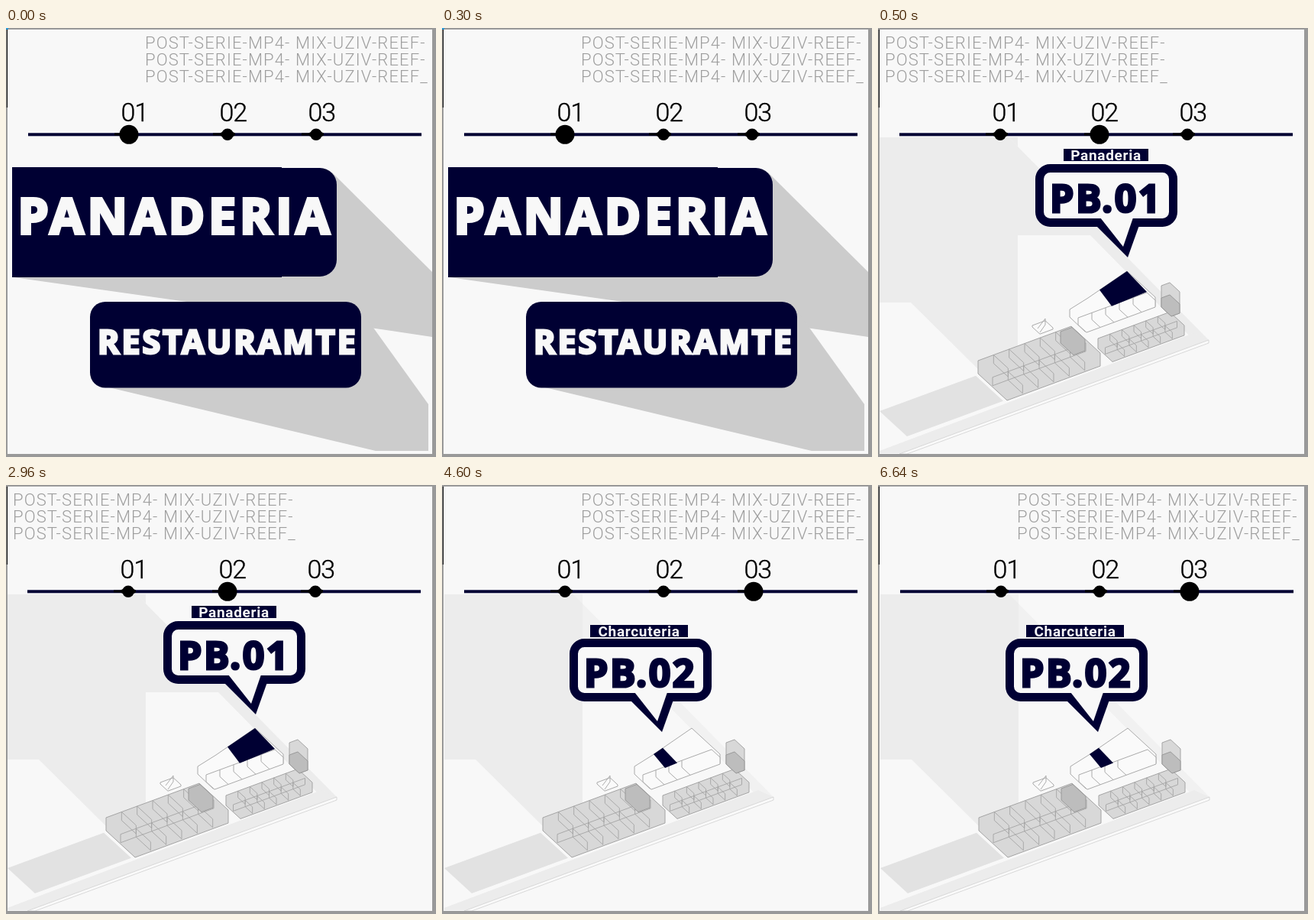
An HTML page for the animation above (8000 ms loop, 563 px wide and 561 px high).

```html
<!DOCTYPE html>
<html lang="es">
<head>
<meta charset="utf-8">
<title>Panaderia</title>
<style>
  html, body { margin: 0; width: 100%; height: 100%; overflow: hidden; background: #f8f8f8; }
  svg { display: block; width: 100%; height: 100%; }
  .header { font: 300 22px Roboto, sans-serif; letter-spacing: 1.12px; fill: #9e9e9e; }
  .number { font: 300 34px Roboto, sans-serif; letter-spacing: -1px; stroke: #000; stroke-width: .4; }
  .heavy { font-family: "Open Sans", sans-serif; font-weight: 700; fill: #f8f8f8; stroke: #f8f8f8; }
  .title { font-size: 64px; letter-spacing: 5px; stroke-width: 4; }
  .subtitle { font-size: 43px; letter-spacing: 3px; stroke-width: 3; }
  .code { font-size: 50px; letter-spacing: 2.5px; stroke-width: 3; fill: #003; stroke: #003; }
  .label { font: 700 19px Roboto, sans-serif; letter-spacing: .7px; fill: #f8f8f8; text-anchor: middle; }
  .navy { fill: #003; }
  .paper { fill: #f8f8f8; }
  .shadow { fill: #ccc; }
  .ground { fill: #ececec; }
  .parcel { fill: #e2e2e2; }
  .block { fill: #d8d8d8; stroke: #a4a4a4; }
  .dark { fill: #bdbdbd; stroke: #999; }
  .walls { fill: none; stroke: #a4a4a4; stroke-width: .9; }
  .room { fill: #fafafa; stroke: #aaa; }
  .curb { fill: #fafafa; stroke: #d5d5d5; stroke-width: .9; }
  .bubble { fill: #f8f8f8; stroke: #003; stroke-width: 11; }
</style>
</head>
<body>
<svg viewBox="0 0 563 561" preserveAspectRatio="none"></svg>
<script>
const LOOP = 8000;
const STARTS = [0, 500, 4600];
const RISE = .368;   // slope of plan lines going right
const FALL = .92;    // slope of plan lines going towards the viewer

const poly = (cls, points) => `<polygon class="${cls}" points="${points}"/>`;
const rect = (cls, x, y, w, h, rx = 0) =>
  `<rect class="${cls}" x="${x}" y="${y}" width="${w}" height="${h}" rx="${rx}"/>`;
const text = (cls, x, y, str) => `<text class="${cls}" x="${x}" y="${y}">${str}</text>`;
const repeat = (n, fn) => Array.from({ length: n }, (_, i) => fn(i)).join('');

const header = x => repeat(3, i =>
  text('header', x, 26.5 + i * 22.4, 'POST-SERIE-MP4- MIX-UZIV-REEF' + '--_'[i]));

function timeline(active, dx) {
  const stops = [161, 290, 406].map((x, i) =>
    text('number', x - 10.5, 121.5, '0' + (i + 1)) +
    `<path d="M${x - 19} 137.5h9l10-5l10 5v3l-10 5l-10-5h-9z"/>` +
    `<circle cx="${x + (i === active ? i : 0)}" cy="139.3" r="${i === active ? 12.5 : 7.8}"/>`);
  return `<g transform="translate(${dx})">${rect('navy', 29, 137.3, 515, 4)}${stops.join('')}</g>`;
}

// Outline of a box in the plan, from its top left back corner
const prism = (cls, x, y, width, depth, height) => `<path class="${cls}" d="M${x} ${y}
  l${width} ${-width * RISE}l${depth} ${depth * FALL}v${height}
  l${-width} ${width * RISE}l${-depth} ${-depth * FALL}z"/>`;

// A box with a middle wall and two rows of partitions
function building(x, y, width, depth, height, count) {
  const half = depth / 2, step = width / (count + 1), wall = height * .65;
  const midY = y + half * FALL + height * .25;
  const partition = (px, py) => `M${px} ${py}l${half} ${half * FALL}v${wall}l${-half} ${-half * FALL}z`;
  const rows = repeat(count, i => {
    const dx = step * (i + 1), dy = dx * RISE;
    return partition(x + dx, y - dy) + partition(x + half + dx, midY - dy);
  });
  return prism('block', x, y, width, depth, height) +
    `<path class="walls" d="M${x + half} ${midY}l${width} ${-width * RISE}v${wall}l${-width} ${width * RISE}z${rows}"/>`;
}

const ground = band =>
  `<path fill="${band}" d="M171 143L433 408H413L278 271H183V143z"/>` +
  poly('ground', '2,143 171,143 183,155 183,415 131,446 43,359 2,359') +
  poly('ground', '2,553 413,399 433,408 33,556 2,556') +
  poly('curb', '433,408 433,412 38,557 28,557') +
  prism('parcel', 2, 501, 126, 36, 0);

const buildings = () =>
  building(131, 435, 122, 38, 17, 5) +
  prism('dark', 239, 397, 15, 17, 15) +
  building(288, 406, 94, 19, 13, 5) +
  prism('room', 202, 389, 17, 10, 2) +
  '<path class="walls" d="M209 393l10-13v8l-7 10"/>' +
  prism('block', 371, 337, 11, 13, 28) +
  prism('dark', 371, 353, 11, 13, 12);

// A shop spans from the slanted back edge to the front corridor
function shop(backLeft, backRight, frontLeft, frontRight) {
  const back = x => `${x},${369 - (x - 251) * .68}`;
  const front = x => `${x},${370 - (x - 291) * .41}`;
  return poly('navy', [back(backLeft), back(backRight), front(frontRight), front(frontLeft)].join(' '));
}

const market = (count, step) =>
  poly('room', '251,368 275,353 326,318 363,352 363,364 271,397 251,378') +
  repeat(count, i => {
    const dx = i * step, width = i < count - 1 ? step : 90 - dx;
    return prism('room', 262 + dx, 379 - dx * RISE, width, 11, 9);
  });

const plan = (dx, band, shops) =>
  `<g transform="translate(${dx})">${ground(band)}${buildings()}${shops}</g>`;

const callout = (dx, dy, code) => `<g transform="translate(${dx} ${dy})">` +
  rect('bubble', 211.5, 183.5, 175, 71, 14) +
  poly('navy', '285,258 342,258 327,300') +
  poly('paper', '291,248 334,248 321,286') +
  text('heavy code', 225, 241, code) + '</g>';

const tag = (x, y, width, str) =>
  rect('navy', x, y, width, 16) + text('label', x + width / 2, y + 15, str);

const scenes = [
  header(182) + timeline(0, 0) +
    poly('shadow', '10,326 484,393 558,404 558,319 427,189') +
    poly('shadow', '458,360 553,492 553,553 484,553 122,467') +
    rect('navy', 8, 183, 425, 142, 22) + rect('navy', 8, 182, 353, 144) +
    text('heavy title', 15.5, 269, 'PANADERIA') +
    rect('navy', 110, 358, 355, 112.5, 20) +
    text('heavy subtitle', 120, 426, 'RESTAURAMTE'),
  plan(0, '#ececec', market(5, 18) + shop(290, 326, 306, 352)) +
    header(9) + timeline(1, -1) + callout(0, 0, 'PB.01') + tag(243, 158, 111, 'Panaderia'),
  plan(1, '#f1f1f1', market(4, 17) + shop(276, 288, 291, 307)) +
    header(182) + timeline(2, 0) + callout(-39, 23, 'PB.02') + tag(194, 183, 128, 'Charcuteria')
];

document.querySelector('svg').innerHTML =
  rect('paper', 0, 0, 563, 561) +
  scenes.map(scene => `<g class="scene">${scene}</g>`).join('') +
  '<path fill="#999" fill-rule="evenodd" d="M0 0H563V561H0zM2 2V557H558V2z"/>' +
  rect('', 1, 2, 1, 102) +
  '<rect class="corner" width="3" height="2" fill="#2a9ad8"/>';

const groups = document.querySelectorAll('.scene');
const corner = document.querySelector('.corner');
const origin = performance.now();

function tick() {
  const time = (performance.now() - origin) % LOOP;
  const current = STARTS.findLastIndex(start => time >= start);
  groups.forEach((g, i) => g.style.display = i === current ? '' : 'none');
  corner.style.display = current === 0 ? '' : 'none';
  requestAnimationFrame(tick);
}
tick();
</script>
</body>
</html>
```
